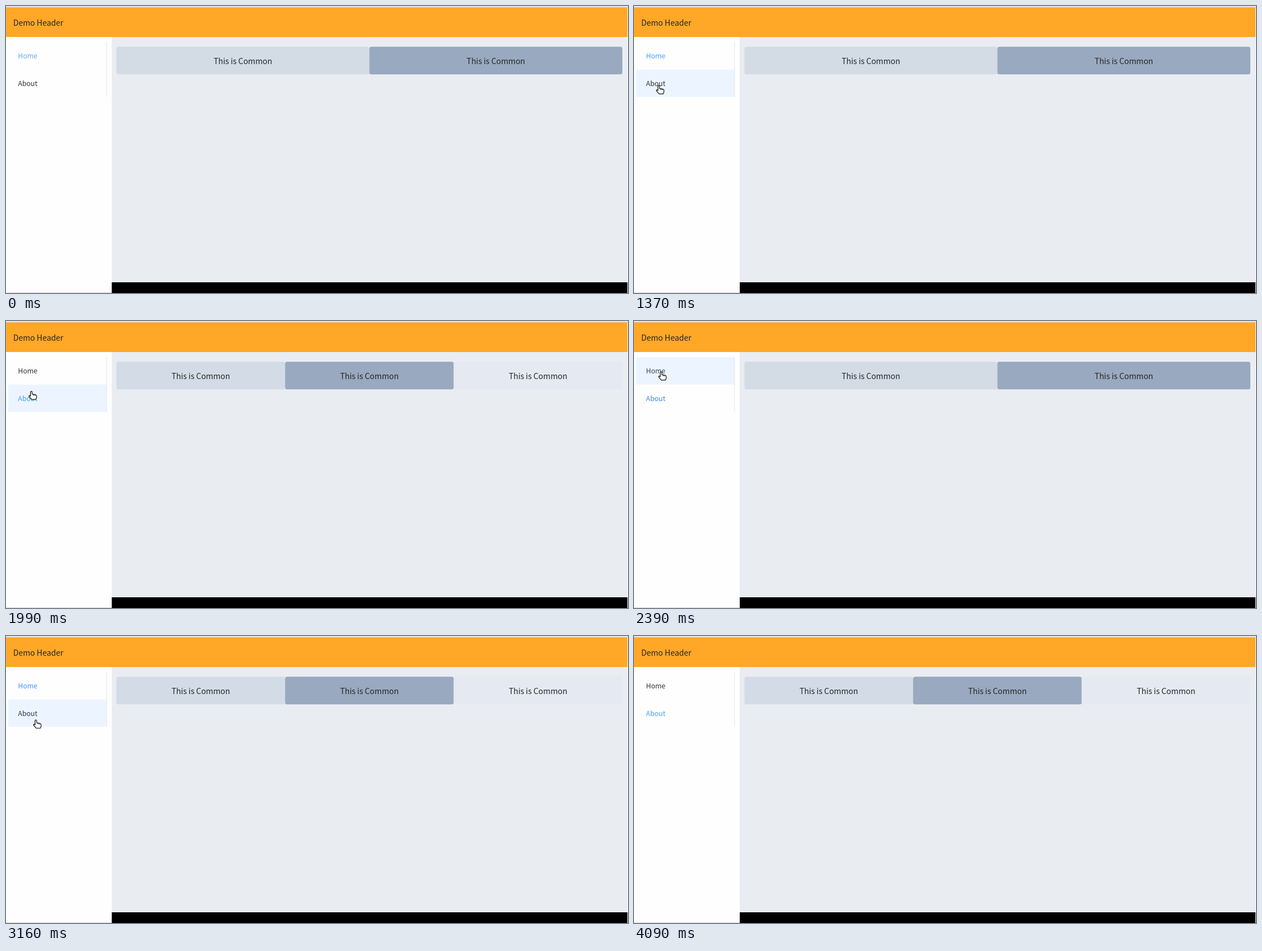
Recreate the animation shown at these times as an HTML page. Size 1100 by 509 pixels, loop 4.79 s.

```html
<!DOCTYPE html>
<html lang="en">
<head>
<meta charset="utf-8">
<title>Demo layout</title>
<style>
  html, body { margin: 0; width: 100%; height: 100%; overflow: hidden; background: #fff; }
  svg { display: block; width: 1100px; height: 509px; }
  text { font: 13.9px "Noto Sans CJK SC", "Noto Sans CJK JP", "Noto Sans CJK", "Noto Sans", sans-serif; fill: #242628; }
  .item { font-size: 12.15px; }
  .label { text-anchor: middle; }
  .cursor { stroke-linejoin: round; }
</style>
</head>
<body>
<svg viewBox="0 0 1100 509">
  <rect width="1100" height="509" fill="#fefefe"/>
  <rect width="1100" height="1.2" fill="#f4f4f4"/>
  <rect y="1.2" width="1100" height="1.3" fill="#cfcfcf"/>
  <rect y="2.5" width="1099" height="52.5" fill="#ffa726"/>
  <text x="12.7" y="35">Demo Header</text>
  <rect x="187" y="55" width="912" height="435" fill="#e9edf2"/>
  <rect y="508" width="187" height="1" fill="#d4d4d4"/>
  <rect x="187" y="490" width="912" height="19"/>
  <rect id="homeBg" x="4" y="64" width="173.5" height="48.6" fill="#ecf5ff"/>
  <rect id="aboutBg" x="4" y="112.6" width="173.5" height="48.6" fill="#ecf5ff"/>
  <rect x="177.3" y="64" width="1" height="97" fill="#e4e4e6"/>
  <text id="home" class="item" x="21.3" y="93.3">Home</text>
  <text id="about" class="item" x="21.3" y="142">About</text>
  <g id="two"></g>
  <g id="three"></g>
  <g id="cursor" class="cursor">
    <path id="arrow" d="M0 0V15.2L3.6 12L6 17.8L8.4 16.7L6 11.2H10.6Z" fill="#fff" stroke="#111" stroke-width="1.1"/>
    <g id="hand" fill="#fff" stroke="#111" stroke-width="1.2">
      <path d="M-1.6 9V1.6a1.4 1.4 0 0 1 2.8 0V5.2L7 6.3Q9 6.9 9 8.6V11.2L7.8 14.8H.4L-4.2 9.6Q-5 8 -3.4 7.6Z"/>
      <path d="M3.6 5.8V8M6.2 6.3V8.3" fill="none" stroke-width="1"/>
    </g>
  </g>
</svg>
<script>
const LOOP = 4790, START = 440, TICK = 77.66, FADE = 300;
const $ = id => document.getElementById(id);

// time, x, y of the pointer's hot spot
const PATH = [
  [440, 1086, 490], [520, 860, 425], [600, 640, 325], [680, 455, 232],
  [750, 328, 168], [830, 215, 118], [910, 138, 90], [980, 82, 112],
  [1060, 58, 130], [1220, 46, 139], [1370, 44, 141], [1450, 41, 139],
  [1520, 46, 134], [1690, 46, 134], [1840, 46, 142], [1990, 45, 125],
  [2150, 47, 97], [2300, 48, 90], [2460, 48, 90], [2620, 50, 108],
  [2700, 51, 131], [2850, 53, 148], [3310, 53, 149], [3390, 58, 128],
  [3540, 82, 66], [3700, 122, 18], [3770, 147, 60], [3860, 300, 165],
  [3940, 560, 320], [4010, 957, 490], [4090, 1010, 520]
];
const HOVER = { home: [[910, 1020], [2110, 2690], [3370, 3560]], about: [[1020, 2110], [2690, 3370]] };
const HOME_ACTIVE = [[-FADE, 1690], [2300, 3110]];

const clamp = v => Math.min(1, Math.max(0, v));
const ease = v => { v = clamp(v); return v * v * (3 - 2 * v); };
const ramp = (t, spans) => clamp(spans.reduce(
  (sum, [a, b]) => sum + ease((t - a) / FADE) - ease((t - b) / FADE), 0));
const mix = (a, b, k) => `rgb(${a.map((v, i) => Math.round(v + (b[i] - v) * k))})`;

function buildRow(id, fills) {
  const left = 195.3, w = 894.7 / fills.length;
  $(id).innerHTML = fills.map((fill, i) => {
    const x = left + i * w;
    return `<rect x="${x}" y="72.3" width="${w}" height="49" rx="3.5" fill="${fill}"/>` +
      `<text class="label" x="${x + w / 2}" y="102.7">This is Common</text>`;
  }).join('');
}
buildRow('two', ['#d3dbe5', '#99a9bf']);
buildRow('three', ['#d3dce6', '#99a9bf', '#e5e9f2']);

function pointer(t) {
  const i = PATH.findIndex(p => p[0] > t);
  if (t < START || i < 0) return null;
  const [ta, xa, ya] = PATH[i - 1], [tb, xb, yb] = PATH[i];
  const k = (t - ta) / (tb - ta);
  return [xa + (xb - xa) * k, ya + (yb - ya) * k];
}

const show = (id, on) => $(id).setAttribute('visibility', on ? 'visible' : 'hidden');

function draw(time) {
  const n = Math.floor((time - START + 5) / TICK);
  const t = n < 0 ? 0 : START + n * TICK;

  const wide = t < 1685 || (t >= 2295 && t < 3150);
  show('two', wide);
  show('three', !wide);

  const blue = t < 980 ? [106, 168, 230] : [64, 158, 255], dark = [48, 49, 51];
  const active = ramp(t, HOME_ACTIVE);
  $('home').style.fill = mix(dark, blue, active);
  $('about').style.fill = mix(blue, dark, active);
  $('homeBg').style.opacity = ramp(t, HOVER.home);
  $('aboutBg').style.opacity = ramp(t, HOVER.about);

  const pos = t < 4080 ? pointer(t) : null;
  const onMenu = pos && pos[0] > 4 && pos[0] < 178 && pos[1] > 64 && pos[1] < 161;
  show('arrow', pos && !onMenu);
  show('hand', onMenu);
  if (pos) $('cursor').setAttribute('transform', `translate(${pos[0].toFixed(1)} ${pos[1].toFixed(1)})`);
}

const begin = performance.now();
function tick() {
  draw((performance.now() - begin) % LOOP);
  requestAnimationFrame(tick);
}
tick();
</script>
</body>
</html>
```
